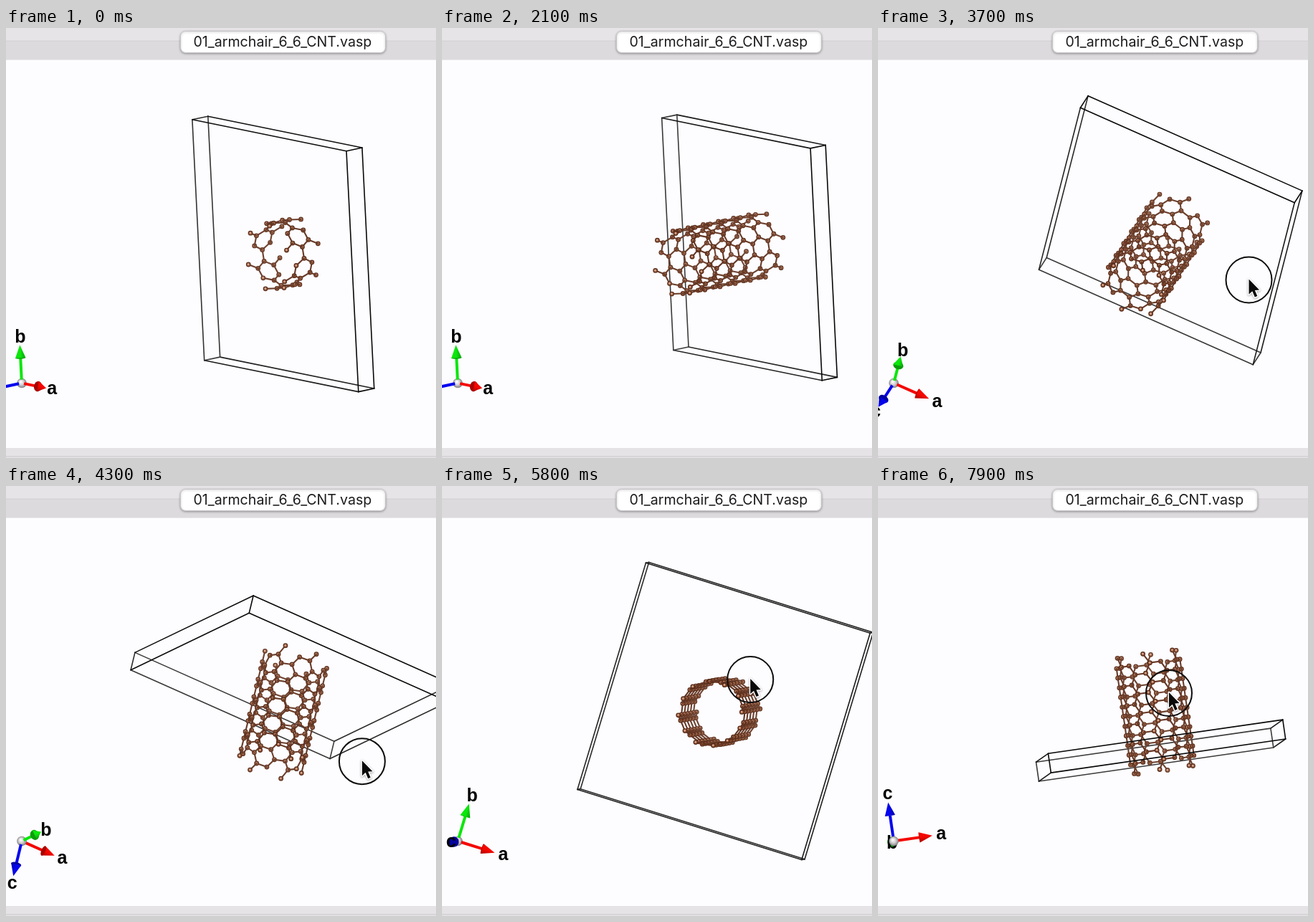
An HTML page with a canvas that plays this animation: 600 px wide and 600 px high, repeating every 8000 ms.

```html
<!DOCTYPE html>
<html lang="en">
<head>
<meta charset="utf-8">
<title>Carbon nanotube viewer</title>
<style>
html, body { margin: 0; width: 100%; height: 100%; overflow: hidden; background: #fdfcfe; }
canvas { display: block; width: 600px; height: 600px; }
</style>
</head>
<body>
<canvas id="stage" width="600" height="600"></canvas>
<script>
const ctx = document.getElementById('stage').getContext('2d');
const LOOP = 8000, STEP = 100;
const UI = 'Inter, "Open Sans", sans-serif';
const PAPER = '#fdfcfe';

// ---------- helpers ----------
const dot = (p, q) => p[0] * q[0] + p[1] * q[1] + p[2] * q[2];
const cross = (p, q) => [p[1] * q[2] - p[2] * q[1], p[2] * q[0] - p[0] * q[2], p[0] * q[1] - p[1] * q[0]];
const unit = p => p.map(v => v / Math.hypot(...p));
const mix = (p, q, k) => p.map((v, i) => v + (q[i] - v) * k);

function rect(x, y, w, h, color) {
  ctx.fillStyle = color;
  ctx.fillRect(x, y, w, h);
}

function round(x, y, w, h, r, color, line) {
  ctx.beginPath();
  ctx.roundRect(x, y, w, h, r);
  ctx.fillStyle = color;
  ctx.fill();
  if (line) {
    ctx.strokeStyle = line;
    ctx.lineWidth = 1;
    ctx.stroke();
  }
}

function button(x, y, w, h) {
  ctx.save();
  ctx.shadowColor = 'rgba(0,0,0,.3)';
  ctx.shadowBlur = 3;
  ctx.shadowOffsetY = 1;
  round(x, y, w, h, 7, '#fff', '#c6c4c7');
  ctx.restore();
}

function text(s, x, y, color = '#1c1b1d', size = 19.6) {
  ctx.font = `${size}px ${UI}`;
  ctx.textAlign = 'left';
  ctx.textBaseline = 'alphabetic';
  ctx.fillStyle = color;
  ctx.fillText(s, x, y);
}

function line(p, q, color, width) {
  ctx.beginPath();
  ctx.moveTo(p[0], p[1]);
  ctx.lineTo(q[0], q[1]);
  ctx.strokeStyle = color;
  ctx.lineWidth = width;
  ctx.stroke();
}

function disc(x, y, r, color) {
  ctx.beginPath();
  ctx.arc(x, y, r, 0, 2 * Math.PI);
  ctx.fillStyle = color;
  ctx.fill();
}

function sample(keys, t) {
  let i = 0;
  while (i < keys.length - 2 && t >= keys[i + 1][0]) i++;
  const [p, q] = [keys[i], keys[i + 1]];
  const k = Math.min(1, Math.max(0, (t - p[0]) / (q[0] - p[0])));
  return p.slice(1).map((v, j) => mix(v, q[j + 1], k));
}

// ---------- crystal ----------
const CELL = [30, 30, 2.45951];
const RADIUS = 4.069;
const CENTER = [386.8, 315.4];

// (6,6) armchair tube: rows half a cell apart, open bonds on one side at both ends
function makeTube(cells) {
  const atoms = [], bonds = [];
  const last = 2 * cells + 1;
  for (let row = -1; row <= last; row++) {
    const mid = row % 2 ? 10 : 40;
    for (let k = 0; k < 6; k++) {
      for (const side of [-10, 10]) {
        if ((row === -1 || row === last) && side < 0) continue;
        const f = (mid + side + 60 * k) * Math.PI / 180;
        atoms.push([RADIUS * Math.cos(f), RADIUS * Math.sin(f), (row - cells) / 2 * CELL[2]]);
      }
    }
  }
  atoms.forEach((p, i) => atoms.forEach((q, j) => {
    if (j > i && Math.hypot(...p.map((v, n) => v - q[n])) < 1.6) bonds.push([i, j]);
  }));
  return { atoms, bonds, cells };
}

const ring = makeTube(1), tube = makeTube(5);

// time, screen x row and screen y row of the orientation
const views = [
  [0, [.626, -.049, -.778], [-.128, .978, -.164]],
  [2700, [.626, -.049, -.778], [-.128, .978, -.164]],
  [3700, [.903, .175, -.395], [-.401, .682, -.612]],
  [4500, [.79, .59, -.15], [-.271, .12, -.955]],
  [4900, [.661, .743, -.104], [-.622, .465, -.63]],
  [6700, [.954, -.25, -.163], [.296, .752, .588]],
  [7000, [.975, -.2, .05], [.2, .965, -.1]],
  [7200, [.985, -.155, -.05], [.155, .985, .03]],
  [7900, [.988, -.051, -.144], [.142, -.036, .989]]
];

function orientation(t) {
  const [p, q] = sample(views, t);
  const x = unit(p), k = dot(x, q);
  const y = unit(q.map((v, i) => v - k * x[i]));
  return [x, y, cross(x, y)];
}

function drawModel(model, m, scale) {
  const project = p => [
    CENTER[0] + scale * dot(m[0], p),
    CENTER[1] - scale * dot(m[1], p),
    dot(m[2], p)
  ];

  const edges = [];
  for (let n = 0; n < 8; n++) {
    for (let axis = 0; axis < 3; axis++) {
      if (n >> axis & 1) continue;
      const [p, q] = [n, n | 1 << axis].map(c => project([
        ((c & 1) - .5) * CELL[0],
        ((c >> 1 & 1) - .5) * CELL[1],
        ((c >> 2 & 1) - model.cells / 2) * CELL[2]
      ]));
      edges.push({ p, q, z: (p[2] + q[2]) / 2 });
    }
  }
  const drawEdge = ({ p, q, z }) => {
    const g = Math.round(Math.min(60, Math.max(8, 24 - z * 2.4)));
    line(p, q, `rgb(${g},${g},${g})`, 1.6);
  };

  const pts = model.atoms.map(project);
  const parts = pts.map(p => ({ z: p[2] + .1, p }));
  for (const [i, j] of model.bonds) parts.push({ z: (pts[i][2] + pts[j][2]) / 2, p: pts[i], q: pts[j] });
  parts.sort((a, b) => a.z - b.z);

  ctx.lineCap = 'round';
  edges.filter(e => e.z < 0).forEach(drawEdge);
  for (const { p, q, z } of parts) {
    const fog = Math.max(0, Math.min(1, .5 - z / 14));
    const tone = (r, g, b) => `rgb(${mix([r, g, b], [205, 175, 160], fog * .16).map(Math.round)})`;
    if (q) {
      line(p, q, tone(98, 52, 33), 2.1);
    } else {
      disc(p[0], p[1], 3.4, tone(84, 40, 22));
      disc(p[0], p[1], 2.2, tone(150, 88, 58));
      disc(p[0] - .2, p[1] - .3, 1.2, tone(222, 176, 154));
    }
  }
  edges.filter(e => e.z >= 0).forEach(drawEdge);
  ctx.lineCap = 'butt';
}

// ---------- axes ----------
const ORIGIN = [22, 495.5];

function drawArrow(v, name, color, dark) {
  const at = d => [ORIGIN[0] + v[0] * d, ORIGIN[1] - v[1] * d];
  const base = at(36), tip = at(54.5), r = 7.2;
  const angle = Math.atan2(-v[1], v[0]), flat = Math.hypot(v[0], v[1]);
  line(at(5), base, color, 4);
  const disk = fill => {
    ctx.beginPath();
    ctx.ellipse(base[0], base[1], r * Math.abs(v[2]), r, angle, 0, 2 * Math.PI);
    ctx.fillStyle = fill;
    ctx.fill();
  };
  if (v[2] > 0) disk(dark);
  if (flat * 18 > r * Math.abs(v[2])) {
    const nx = -Math.sin(angle) * r, ny = Math.cos(angle) * r;
    const g = ctx.createLinearGradient(base[0] - nx, base[1] - ny, base[0] + nx, base[1] + ny);
    g.addColorStop(0, color);
    g.addColorStop(.5, color);
    g.addColorStop(1, dark);
    ctx.beginPath();
    ctx.moveTo(base[0] + nx, base[1] + ny);
    ctx.lineTo(tip[0], tip[1]);
    ctx.lineTo(base[0] - nx, base[1] - ny);
    ctx.fillStyle = g;
    ctx.fill();
  }
  if (v[2] <= 0) disk(dark);
  const pos = at(66);
  ctx.font = 'bold 25px "Liberation Sans", Arial, sans-serif';
  ctx.textAlign = 'center';
  ctx.textBaseline = 'alphabetic';
  ctx.fillStyle = '#000';
  ctx.fillText(name, pos[0] + 1, pos[1] + (name === 'b' ? 8 : 7));
}

function drawBall() {
  const [x, y] = ORIGIN;
  const g = ctx.createRadialGradient(x - 1.5, y - 2, .5, x, y, 7);
  g.addColorStop(0, '#fff');
  g.addColorStop(.5, '#cfcdcf');
  g.addColorStop(1, '#79777a');
  disc(x, y, 6.8, g);
}

function drawAxes(m) {
  const look = [['a', '#f40600', '#a80400'], ['b', '#0be70b', '#0a9c0a'], ['c', '#0505ee', '#0303a0']];
  const items = look.map((s, i) => {
    const v = m.map(row => row[i]);
    return { z: v[2], draw: () => drawArrow(v, ...s) };
  });
  items.push({ z: 0, draw: drawBall });
  items.sort((a, b) => a.z - b.z).forEach(i => i.draw());
}

// ---------- pointer ----------
const ENTER = 2200, PRESS = 2750;
const pointer = [
  [ENTER, [622, 318]], [2500, [577, 321]], [2700, [455, 305]], [3700, [517.5, 351.5]],
  [4500, [490, 395]], [4900, [390, 291]], [6700, [470.5, 249]], [7100, [440, 335]], [7900, [406, 289]]
];

function drawPointer(t) {
  const [[x, y]] = sample(pointer, t);
  if (t >= PRESS) {
    ctx.beginPath();
    ctx.arc(x, y, 32, 0, 2 * Math.PI);
    ctx.strokeStyle = '#0c0c0c';
    ctx.lineWidth = 2;
    ctx.stroke();
  }
  ctx.save();
  ctx.translate(x, y - 1);
  ctx.beginPath();
  [[0, 0], [0, 21], [4.8, 16.7], [8.3, 25], [11.8, 23.5], [8.3, 15.4], [14.6, 15]].forEach(p => ctx.lineTo(...p));
  ctx.closePath();
  ctx.shadowColor = 'rgba(0,0,0,.35)';
  ctx.shadowBlur = 3;
  ctx.shadowOffsetY = 1;
  ctx.lineJoin = 'round';
  ctx.strokeStyle = '#fff';
  ctx.lineWidth = 3;
  ctx.stroke();
  ctx.shadowColor = 'transparent';
  ctx.fillStyle = '#0a0a0a';
  ctx.fill();
  ctx.restore();
}

// ---------- screens ----------
function drawViewer(t) {
  rect(0, 0, 600, 600, PAPER);
  const m = orientation(t);
  const long = t >= 1900;
  drawModel(long ? tube : ring, m, long ? 11.04 : 11.45);
  drawAxes(m);
  rect(0, 0, 600, 18, '#e6e4e7');
  rect(0, 18, 600, 26.5, '#dcdadd');
  rect(0, 17.5, 600, 1, '#d3d1d4');
  rect(0, 586, 600, 14, '#e5e3e6');
  rect(0, 597, 600, 1.5, '#d2d0d3');
  button(243.5, 4.5, 286, 30);
  text('01_armchair_6_6_CNT.vasp', 261.5, 26);
  if (t >= ENTER) drawPointer(t);
}

const ROW = 29.75, TOP = 124;

function table(x, w, rows, split, tx) {
  ctx.save();
  ctx.beginPath();
  ctx.rect(x, 98, w, 274);
  ctx.clip();
  rect(x, 98, w, 274, PAPER);
  rows.forEach((cells, i) => {
    const y = TOP + i * ROW;
    if (i === 0) rect(x, y, w, ROW, '#d0ced1');
    else if (i % 2) {
      rect(x, y, w, ROW, '#f3f2f3');
      rect(split, y, 1.5, ROW, PAPER);
    }
    const grey = cells.length === 1 && i > 1;
    cells.forEach((s, j) => text(s, tx[j], y + 22, grey ? '#8e8c8f' : undefined));
  });
  ctx.restore();
}

function drawDialog() {
  rect(0, 0, 600, 600, '#dfdde0');
  round(-20, -30, 597, 35.5, 7, '#dbd9dc', '#d0ced1');
  button(-20, -20, 34, 24);
  rect(0, 46, 600, 389, '#d9d7da');
  rect(0, 46, 600, 1, '#cfcdd0');
  rect(0, 435, 600, 1, '#cfcdd0');

  const groups = ['P 1', 'P -1', 'P 2', 'P 21', 'C 2', 'P m', 'P c', 'C m', 'C c'];
  table(0, 231, groups.map(s => [s]), 27.5, [34]);
  rect(229.5, 98, 23, 274, '#f8f7f9');
  rect(230, 98, 1, 274, '#e4e2e5');
  round(236, 103, 12, 27, 6, '#6e6c6f');
  text('Space Group', 37, 118);

  const settings = [...'PABCIFR'].map((s, i) => [String(i + 1), s + ' 1']);
  table(262, 338, settings, 327, [266, 333]);
  rect(262, 350, 338, 22, '#f8f7f9');
  rect(262, 350, 338, 1, '#e4e2e5');
  round(266, 356, 360, 12, 6, '#6e6c6f');
  text('No.', 269, 118);
  text('Setting', 336, 118);
  for (const x of [28, 229, 261, 327]) rect(x, 103, 2, 16, '#dcdadd');

  button(-20, 387.5, 168.5, 29);
  text('Customize...', 10, 408);
  button(158.5, 384, 470, 30);
  text('Update structure parameters to keep 3D geometry', 172, 405);

  round(-20, 483, 604, 140, 7, '#d7d5d8', '#cecccf');
  ['b (Å)', 'c (Å)', 'α (°)', 'β (°)', 'γ (°)'].forEach((s, i) => {
    const x = 2.5 + i * 113.1;
    text(s, x + 7.5, 518);
    const value = [['30.00000', '2.45951'][i] || '90.0000', i < 2 ? '0.00000' : '0.0000'];
    value.forEach((v, j) => {
      const y = 526.5 + j * 36;
      rect(x - .5, y - .5, 109.5, 32, '#c3c1c4');
      rect(x + .5, y + .5, 107.5, 29.5, PAPER);
      text(v, x + 5, y + 24.5);
    });
  });
}

const start = performance.now();

function frame() {
  const t = Math.floor((performance.now() - start) % LOOP / STEP) * STEP;
  if (t >= 800 && t < 1900) drawDialog();
  else drawViewer(t);
  requestAnimationFrame(frame);
}

frame();
</script>
</body>
</html>
```
